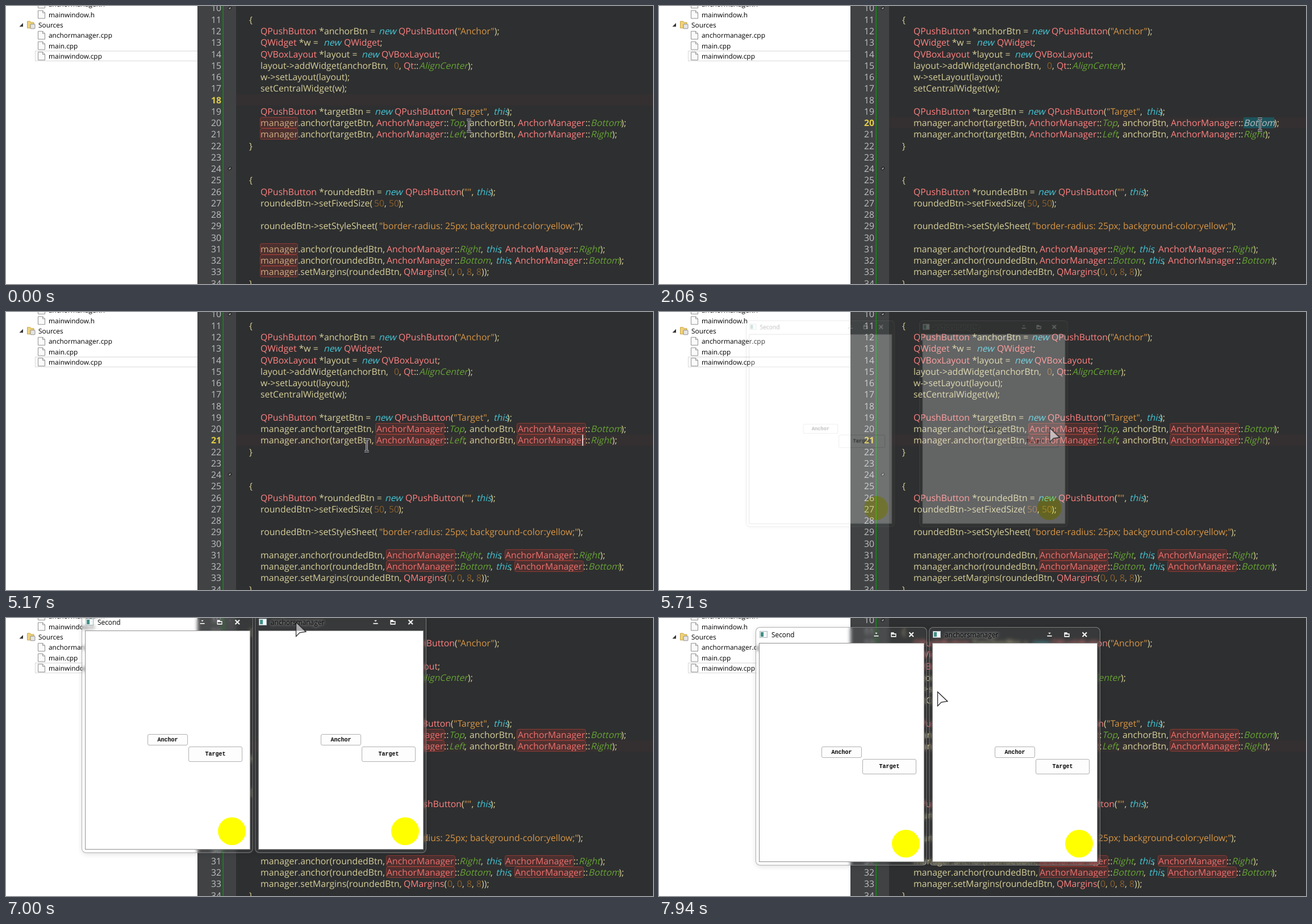
An HTML page that plays this animation: 1139 by 491 pixels, repeating every 8 s.

```html
<!DOCTYPE html>
<html lang="en">
<head>
<meta charset="utf-8">
<title>Anchor manager demo</title>
<style>
html, body { margin: 0; width: 100%; height: 100%; overflow: hidden; background: #fff; }
#stage { position: relative; width: 1139px; height: 491px; overflow: hidden; }
svg { position: absolute; left: 0; top: 0; display: block; }
#page text { white-space: pre; text-rendering: geometricPrecision; }
.code { font: 15.8px "Open Sans", "Noto Sans", sans-serif; fill: #d6cf9a; }
.type { fill: #ff8080; }
.word { fill: #45c6d6; }
.enum { fill: #66a334; }
.str { fill: #d69545; }
.num { fill: #8a602c; }
.picked { fill: #bdbec0; }
.no { fill: #bec0c2; text-anchor: end; }
.now { fill: #e0cc45; font-weight: bold; }
.tree { font: 11.9px "Open Sans", "Noto Sans", sans-serif; fill: #000; }
.box { fill: #b4372e; fill-opacity: .22; stroke: #8c3a34; }

.win {
  position: absolute; top: -6px; width: 300px; height: 419px;
  border: 1px solid rgba(150, 150, 150, .75); border-radius: 8px;
  background: rgba(255, 255, 255, .05);
  box-shadow: 0 2px 10px rgba(0, 0, 0, .12);
  transform-origin: 50% 37%;
  font: 11.9px "Open Sans", "Noto Sans", sans-serif; color: #000;
  animation: open 8s linear infinite, drag 8s linear infinite;
}
.win > * { position: absolute; box-sizing: border-box; }
.title {
  left: 27px; top: 4px; line-height: 17px;
  text-shadow: 0 0 5px rgba(255, 255, 255, .6), 0 0 8px rgba(255, 255, 255, .45);
}
.client { left: 5px; top: 27px; width: 291px; height: 387px; background: #fff; border: 1px solid #8d8d8d; }
.btn {
  border: 1px solid #b0b0b0; border-radius: 3px; background: #fdfdfd;
  font: bold 10px "Liberation Mono", monospace;
  display: flex; align-items: center; justify-content: center;
}
.anchor { left: 115px; top: 210px; width: 71px; height: 20px; }
.target { left: 187px; top: 232px; width: 95px; height: 27px; }
.disc { left: 239px; top: 357px; width: 49px; height: 49px; border-radius: 50%; background: #ff0; }

.flip { opacity: 0; animation: 8s step-end infinite; }
.mgr { animation-name: mgr; }
.types { animation-name: types; }
.line18 { animation-name: line18; }
.line20 { animation-name: line20; }
.line21 { animation-name: line21; }
.caret18 { animation-name: caret18; }
.caret21 { animation-name: caret21; }
.top { animation-name: top; }
.bottom { animation-name: bottom; }
.arrow { animation-name: arrow; }
.beam { animation-name: beam; }
#cursor { animation: move 8s linear infinite; overflow: visible; }

@keyframes mgr { 0% { opacity: 1 } 2.5%, 100% { opacity: 0 } }
@keyframes types { 0% { opacity: 0 } 36.2%, 100% { opacity: 1 } }
@keyframes line18 { 0% { opacity: 1 } 16.49%, 100% { opacity: 0 } }
@keyframes line20 { 0%, 32.25%, 100% { opacity: 0 } 16.49% { opacity: 1 } }
@keyframes line21 { 0% { opacity: 0 } 32.25%, 100% { opacity: 1 } }
@keyframes caret18 { 0%, 13.12%, 100% { opacity: 0 } 7% { opacity: 1 } }
@keyframes caret21 {
  0%, 38.87%, 52.12%, 67.24%, 100% { opacity: 0 }
  32.25%, 46.12%, 58.75% { opacity: 1 }
}
@keyframes top { 0%, 25.74%, 100% { opacity: 0 } 16.49% { opacity: 1 } }
@keyframes bottom { 0%, 32.25%, 100% { opacity: 0 } 25.74% { opacity: 1 } }
@keyframes arrow { 0%, 61.8% { opacity: 0 } 35%, 71%, 100% { opacity: 1 } }
@keyframes beam { 0%, 61.8% { opacity: 1 } 35%, 71%, 100% { opacity: 0 } }
@keyframes open {
  0%, 70.6% { opacity: 0; scale: .82; backdrop-filter: blur(0) }
  73.68% { opacity: 1; scale: 1; backdrop-filter: blur(0) }
  73.7%, 100% { opacity: 1; scale: 1; backdrop-filter: blur(3px) }
}
@keyframes drag { 0%, 87.5% { translate: 0 0 } 92.5%, 100% { translate: 37px 22px } }
@keyframes move {
  0%, 1.1% { translate: 815px 211px }
  10.4%, 13.1% { translate: 935px 213px }
  14.7%, 19.5% { translate: 795px 209px }
  23.9% { translate: 1056px 209px }
  25.7%, 28.7% { translate: 1058px 209px }
  31.2%, 32.3% { translate: 1015px 226px }
  35.1%, 35.9% { translate: 308px 284px }
  41%, 43.6% { translate: 179px 126px }
  45.37%, 45.9% { translate: 43px 340px }
  48.4%, 57.2% { translate: 0 446px }
  58.7% { translate: 2px 461px }
  64.6%, 67.2% { translate: 635px 235px }
  73.2%, 73.7% { translate: 710px 191px }
  76.9%, 77.6% { translate: 453px 60px }
  81%, 82.9% { translate: 496px 14px }
  85.5%, 87.5% { translate: 510px 7px }
  92.5%, 93.7% { translate: 547px 29px }
  97%, 98.1% { translate: 499px 127px }
  99.2%, 100% { translate: 490px 130px }
}
</style>
</head>
<body>
<div id="stage">
  <svg id="page" width="1139" height="491"></svg>
  <svg id="cursor" width="1" height="1">
    <path class="flip arrow" d="M.5.5V25.5L7 18.8 18 17.2Z" fill="#f5f5f9" fill-opacity=".6" stroke="#222" stroke-width="1.2"/>
    <g class="flip beam" fill="none">
      <path d="M-4-10H4M0-10V11M-4 11H4" stroke="#bcbdc6" stroke-width="3.6"/>
      <path d="M-4-10H4M0-10V11M-4 11H4" stroke="#25262a" stroke-width="1.3"/>
    </g>
  </svg>
</div>
<script>
const FIRST = 10, LAST = 34, STEP = 20.26;
const baseline = n => 50 + (n - 12) * STEP;
const lineTop = n => 155.5 + (n - 18) * STEP;

// Each piece is "x text"; pieces are parted by |
const code = {
  11: '428 {',
  12: '448 QPushButton *anchorBtn = |656 new|691 QPushButton("Anchor");',
  13: '448 QWidget *w = |559 new|595 QWidget;',
  14: '448 QVBoxLayout *layout = |626 new|661 QVBoxLayout;',
  15: '448 layout->addWidget(anchorBtn, |683 0,|700 Qt::|727 AlignCenter|813 );',
  16: '448 w->setLayout(layout);',
  17: '448 setCentralWidget(w);',
  19: '448 QPushButton *targetBtn = |649 new|684 QPushButton(|788 "Target",|858 this|882 );',
  20: '448 manager.anchor(targetBtn,|652 AnchorManager|771 ::|780 Top|807 ,|816 anchorBtn,|901 AnchorManager|1020 ::|1029 Bottom|1083 );',
  21: '448 manager.anchor(targetBtn,|652 AnchorManager|771 ::|780 Left|807 ,|816 anchorBtn,|901 AnchorManager|1020 ::|1029 Right|1067 );',
  22: '428 }',
  25: '428 {',
  26: '448 QPushButton *roundedBtn = |667 new|703 QPushButton("",|828 this|853 );',
  27: '448 roundedBtn->setFixedSize(|648 50,|674 50|691 );',
  29: '448 roundedBtn->setStyleSheet(|657 "border-radius: 25px; background-color:yellow;"|1007 );',
  31: '448 manager.anchor(roundedBtn,|670 AnchorManager|790 ::|798 Right|836 ,|845 this|869 ,|879 AnchorManager|999 ::|1008 Right|1046 );',
  32: '448 manager.anchor(roundedBtn,|670 AnchorManager|790 ::|798 Bottom|853 ,|862 this|887 ,|896 AnchorManager|1016 ::|1025 Bottom|1079 );',
  33: '448 manager.setMargins(roundedBtn,|700 QMargins(|777 0,|794 0,|811 8,|828 8));',
  34: '428 }'
};

const rules = [
  ['str', '"[^"]*"'],
  ['type', '\\b(?:Q\\w+|AnchorManager)\\b'],
  ['num', '\\b\\d+\\b']
];
const lexer = new RegExp(rules.map(r => `(${r[1]})`).join('|'), 'g');
const paint = s => s.replace(lexer, (m, ...groups) =>
  `<tspan class="${rules[groups.findIndex((g, i) => i < rules.length && g)][0]}">${m}</tspan>`);

const rect = (x, y, w, h, attrs) => `<rect x="${x}" y="${y}" width="${w}" height="${h}" ${attrs}/>`;
const text = (x, y, s, cls = '') => `<text x="${x}" y="${y}" class="${cls}">${s}</text>`;
const slanted = (x, y, s, cls) => `<text transform="translate(${x} ${y}) skewX(-14)" class="${cls}">${s}</text>`;
const group = (cls, s) => `<g class="${cls}">${s}</g>`;
const range = (a, b) => Array.from({ length: b - a + 1 }, (_, i) => a + i);

const codePiece = (x, y, s) => {
  if (/^(new|this)$/.test(s)) return slanted(x, y, s, 'word');
  if (/^(AlignCenter|Top|Left|Right|Bottom)$/.test(s)) return slanted(x, y, s, 'enum');
  return text(x, y, paint(s));
};
const codeLine = n => code[n].split('|').map(piece => {
  const [, x, s] = piece.match(/^(\d+) (.*)$/);
  return codePiece(x, baseline(n), s);
}).join('');

const currentLine = n => group(`flip line${n}`,
  rect(405, lineTop(n), 734, 20.3, 'fill="#343031"') +
  rect(345, lineTop(n), 36, 20.3, 'fill="#404244"') +
  text(379, baseline(n), n, 'no now'));

const box = (x, n, w) => rect(x + .5, Math.round(lineTop(n)) + .5, w, 19, 'rx="3" class="box"');
const caret = (x, n) => group(`flip caret${n}`, rect(x, lineTop(n) + .5, 1.6, 19.5, 'fill="#f0f0f0"'));
const selection = (cls, x, w, s) => group(`flip ${cls}`,
  rect(x, lineTop(20) + .5, w, 19.5, 'fill="#1d545c"') + slanted(x, baseline(20), s, 'picked'));
const fold = y => `<ellipse cx="394" cy="${y}" rx="3" ry="2" transform="rotate(-35 394 ${y})" fill="#8a8a8a" stroke="#111"/>`;

const fileRow = (name, i) => {
  const y = 15 + (i - 1) * 18.35;
  return `<path d="M56.5 ${y - 7}h8l4 4v10h-12zM64.5 ${y - 7}v4h4" fill="#fbfbfb" stroke="#8f8f8f"/>` +
    text(75, y + 4.6, name);
};
const tree = group('tree',
  rect(51.5, 79.5, 300, 17.5, 'fill="#fff" stroke="#d8d8d8"') +
  ['anchormanager.h', 'mainwindow.h', '', 'anchormanager.cpp', 'main.cpp', 'mainwindow.cpp']
    .map((name, i) => name && fileRow(name, i)).join('') +
  '<path d="M30 30v6.5h-6.5z" fill="#333"/>' +
  '<path d="M37.5 27h5l1.5 2h5v10h-11.5z" fill="#f0d27a" stroke="#c9a544"/>' +
  rect(43, 32, 8, 8, 'rx="1" fill="#e4e4e4" stroke="#777" stroke-width=".8"') +
  text(57, 38, 'Sources'));

const managerBoxes = [20, 21, 31, 32, 33].map(n => box(447, n, 66)).join('');
const typeBoxes = [[650, 20], [899, 20], [650, 21], [899, 21], [669, 31], [878, 31], [669, 32], [895, 32]]
  .map(([x, n]) => box(x, n, 121)).join('');

document.getElementById('page').innerHTML = tree +
  rect(337, 0, 802, 491, 'fill="#2e2f30"') +
  rect(337, 0, 68, 491, 'fill="#404244"') +
  rect(381.5, 0, 1.6, 491, 'fill="#128a12"') +
  fold(4) + fold(287) +
  group('code',
    range(FIRST, LAST).map(n => text(379, baseline(n), n, 'no')).join('') +
    [18, 20, 21].map(currentLine).join('') +
    Object.keys(code).map(Number).map(codeLine).join('') +
    group('flip mgr', managerBoxes) +
    group('flip types', typeBoxes) +
    selection('top', 780, 27, 'Top') +
    selection('bottom', 1029, 54, 'Bottom') +
    caret(409, 18) + caret(1014.5, 21));

const windowIcons = `<svg width="300" height="26">
  <rect x="6.5" y="6.5" width="13" height="11" fill="#f4f8f8" stroke="#a9b4b8"/>
  <rect x="8" y="8" width="5" height="8" fill="#3f8f86"/>
  <g stroke="#222" stroke-width=".6" fill="#fff">
    <path d="M207 13.5h9v2.4h-9zM208.5 8.5h6l-3 3.4z"/>
    <path d="M237 8h6v2h4v7h-10zM239 12.5v2h6v-2z" fill-rule="evenodd"/>
  </g>
  <path d="M269.5 8.5l7.5 7.5M277 8.5l-7.5 7.5" stroke="#fff" stroke-width="2"/>
</svg>`;

const addWindow = (title, left) => {
  const win = document.createElement('div');
  win.className = 'win';
  win.style.left = left + 'px';
  win.innerHTML = windowIcons + `<div class="title">${title}</div><div class="client"></div>
    <div class="btn anchor">Anchor</div><div class="btn target">Target</div><div class="disc"></div>`;
  document.getElementById('cursor').before(win);
};
addWindow('Second', 133);
addWindow('anchorsmanager', 438);
</script>
</body>
</html>
```
